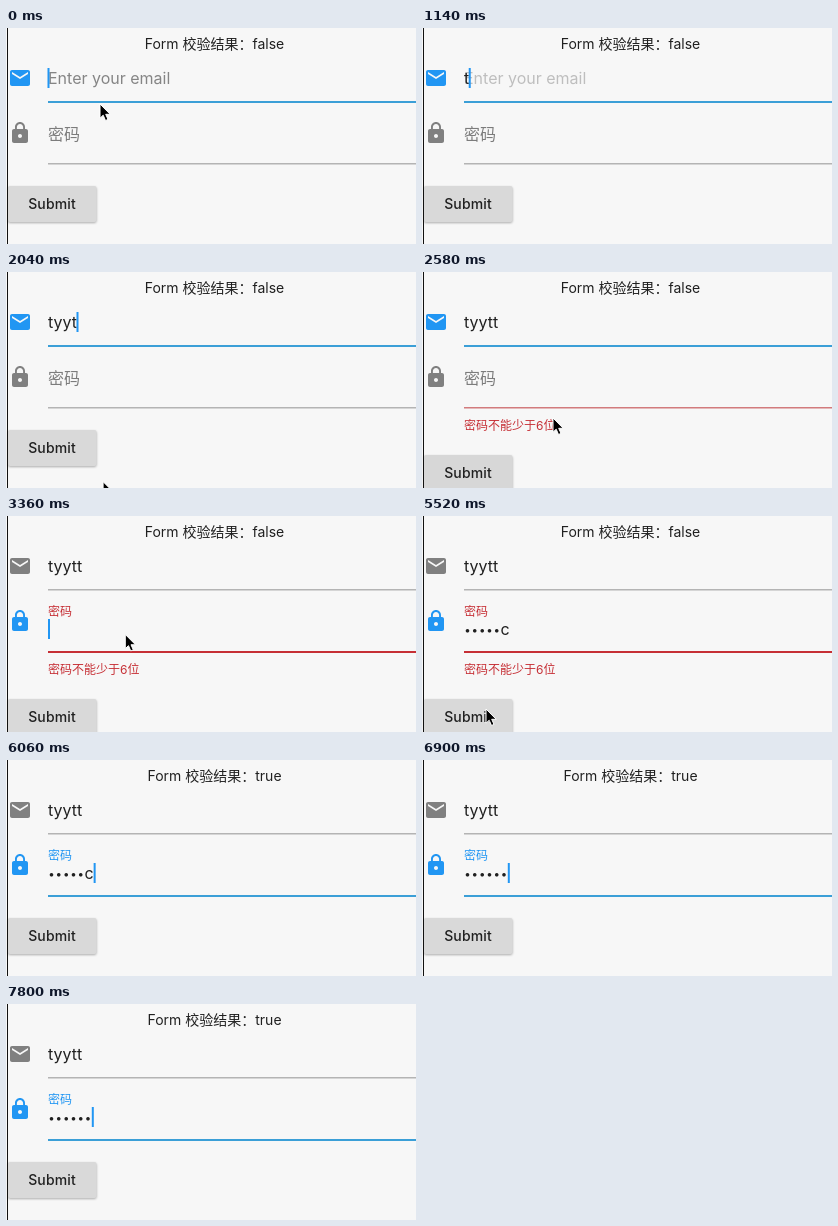
An HTML page for the animation above (7860 ms loop, 410 by 216 pixels).

```html
<!DOCTYPE html>
<html lang="zh">
<head>
<meta charset="utf-8">
<title>Form</title>
<style>
  html, body { margin: 0; width: 100%; height: 100%; overflow: hidden; background: #f7f7f7; }
  svg { display: block; width: 410px; height: 216px; }
  text { font-family: Inter, "Noto Sans CJK SC", "Noto Sans CJK", sans-serif; font-size: 16px; }
  #header { font-size: 14px; text-anchor: middle; }
  #hint { fill: #858585; }
  #bullets { font-size: 11.5px; }
  #error { font-size: 12px; fill: #c62f35; }
  #button text { font-size: 14px; font-weight: 500; text-anchor: middle; letter-spacing: .15px; }
  #button rect { filter: drop-shadow(0 1.5px 1.2px rgba(0, 0, 0, .3)); }
</style>
</head>
<body>
<svg viewBox="0 0 410 216" fill="#202020">
  <rect width="410" height="216" fill="#f7f7f7"/>
  <text id="header" x="208.5" y="21"></text>

  <path id="mail" transform="translate(2 38)" d="M20 4H4c-1.1 0-1.99.9-1.99 2L2 18c0 1.1.9 2 2 2h16c1.1 0 2-.9 2-2V6c0-1.1-.9-2-2-2zm0 4l-8 5-8-5V6l8 5 8-5v2z"/>
  <rect id="emailLine" x="42" y="73" width="368"/>
  <text id="hint" x="42" y="56">Enter your email</text>
  <text id="email" x="42" y="56"></text>

  <path id="lock" transform="translate(2 93)" d="M18 8h-1V6c0-2.76-2.24-5-5-5S7 3.24 7 6v2H6c-1.1 0-2 .9-2 2v10c0 1.1.9 2 2 2h12c1.1 0 2-.9 2-2V10c0-1.1-.9-2-2-2zm-6 9c-1.1 0-2-.9-2-2s.9-2 2-2 2 .9 2 2-.9 2-2 2zm3.1-9H8.9V6c0-1.71 1.39-3.1 3.1-3.1 1.71 0 3.1 1.39 3.1 3.1v2z"/>
  <rect id="passwordLine" x="42" y="135" width="368"/>
  <text id="label">密码</text>
  <text id="bullets" y="117.5"></text>
  <text id="lastChar" y="119"></text>
  <text id="error" x="42" y="157.5">密码不能少于6位</text>
  <rect id="caret" width="2" height="20" fill="#2196f3"/>

  <g id="button">
    <rect x="2" y="158" width="88.5" height="36" rx="2" fill="#d9d9d9"/>
    <circle id="ripple" cx="60" cy="178" fill="#000" clip-path="url(#buttonClip)"/>
    <text x="46" y="181">Submit</text>
  </g>
  <clipPath id="buttonClip"><rect x="2" y="158" width="88.5" height="36" rx="2"/></clipPath>

  <rect x="1" width="1" height="216" fill="#111"/>
  <path id="pointer" d="M0 0V14.2L3.2 11.2L5.5 16.5L8 15.4L5.7 10.3H10.2Z" fill="#000" stroke="#fff"/>
</svg>
<script>
const LOOP = 7860, BLINK = LOOP / 8, BLINK_PHASE = 220;
const LEFT = 42, BULLET_STEP = 7.3;
const BLUE = '#2196f3', LINE_BLUE = '#3b9fd7', GREY = '#808080', LINE_GREY = '#b4b4b4';
const RED = '#c62f35', LINE_RED = '#d27b7d';

const FIRST_SUBMIT = 2260, FOCUS_PASSWORD = 3150, SECOND_SUBMIT = 5720, MASK_LAST = 6820;
const EMAIL = { text: 'tyytt', start: 1040, step: 260 };
const PASSWORD = { text: 'hnbvxc', start: 3890, step: 170 };

// The pointer rests between moves; y = 222 is below the stage.
const MOVES = [
  { at: 60, ms: 420, x: 114, y: 222 },
  { at: 1980, ms: 160, x: 62, y: 184 },
  { at: 2320, ms: 260, x: 131, y: 146 },
  { at: 2640, ms: 420, x: 118, y: 106 },
  { at: 3300, ms: 300, x: 130, y: 222 },
  { at: 5200, ms: 300, x: 64, y: 193 },
  { at: 5800, ms: 180, x: 72, y: 222 }
];

const $ = id => document.getElementById(id);
const set = (id, attrs) => Object.entries(attrs).forEach(([k, v]) => $(id).setAttribute(k, v));
const clamp = (v, max = 1) => Math.max(0, Math.min(max, v));
const progress = (t, start, length = 200) => clamp((t - start) / length);
const ease = p => p * p * (3 - 2 * p);
const typedCount = (t, { text, start, step }) => clamp(Math.floor((t - start) / step) + 1, text.length);

function drawPointer(t) {
  let x = 94, y = 76;
  for (const move of MOVES) {
    const p = ease(progress(t, move.at, move.ms));
    x += (move.x - x) * p;
    y += (move.y - y) * p;
  }
  set('pointer', { transform: `translate(${x} ${y})` });
}

function drawRipple(t) {
  const press = (t < FOCUS_PASSWORD ? FIRST_SUBMIT : SECOND_SUBMIT) - 60;
  set('ripple', { r: 70 * progress(t, press, 300), opacity: 0.1 * (1 - progress(t, press + 150, 250)) });
}

function caretOpacity(t) {
  const lastKey = ({ start, step }, n) => n ? start + (n - 1) * step : -Infinity;
  const wake = [
    lastKey(EMAIL, typedCount(t, EMAIL)),
    lastKey(PASSWORD, typedCount(t, PASSWORD)),
    FOCUS_PASSWORD
  ];
  if (wake.some(w => t >= w && t < w + 300)) return 1;
  const phase = (t + BLINK_PHASE) % BLINK;
  return progress(phase, 0, 150) - progress(phase, BLINK / 2, 150);
}

function drawEmail(t) {
  $('email').textContent = EMAIL.text.slice(0, typedCount(t, EMAIL));
  set('hint', { opacity: 1 - progress(t, EMAIL.start) });
  return LEFT + $('email').getComputedTextLength();
}

function drawPassword(t) {
  const typed = typedCount(t, PASSWORD);
  const masked = t >= MASK_LAST ? typed : Math.max(0, typed - 1);
  const end = LEFT + masked * BULLET_STEP;
  $('bullets').textContent = '•'.repeat(masked);
  set('bullets', { x: Array.from({ length: masked }, (_, i) => LEFT + 0.3 + i * BULLET_STEP).join(' ') });
  $('lastChar').textContent = PASSWORD.text.slice(masked, typed);
  set('lastChar', { x: end });
  return end + $('lastChar').getComputedTextLength();
}

function render(t) {
  const onPassword = t >= FOCUS_PASSWORD;
  const valid = t >= SECOND_SUBMIT;
  const invalid = t >= FIRST_SUBMIT && !valid;

  $('header').textContent = `Form 校验结果：${valid}`;
  set('mail', { fill: onPassword ? GREY : BLUE });
  set('lock', { fill: onPassword ? BLUE : GREY });
  set('emailLine', { fill: onPassword ? LINE_GREY : LINE_BLUE, height: onPassword ? 1.5 : 2 });
  set('passwordLine', {
    fill: onPassword ? (invalid ? RED : LINE_BLUE) : (invalid ? LINE_RED : LINE_GREY),
    height: onPassword ? 2 : 1.5
  });

  const emailEnd = drawEmail(t), passwordEnd = drawPassword(t);
  set('caret', {
    x: onPassword ? passwordEnd : emailEnd - 0.5,
    y: onPassword ? 103 : 40,
    opacity: caretOpacity(t)
  });

  const float = ease(progress(t, FOCUS_PASSWORD));
  set('label', {
    transform: `translate(${LEFT} ${111.5 - 12 * float}) scale(${1 - 0.25 * float})`,
    fill: !onPassword ? '#7c7c7c' : invalid ? RED : BLUE
  });

  const shown = progress(t, FIRST_SUBMIT) - progress(t, SECOND_SUBMIT);
  set('error', { opacity: shown, transform: `translate(0 ${-3 * (1 - shown)})` });
  set('button', { transform: `translate(0 ${invalid ? 25 : 0})` });

  drawRipple(t);
  drawPointer(t);
}

const began = performance.now();
function tick() {
  render((performance.now() - began) % LOOP);
  requestAnimationFrame(tick);
}
tick();
</script>
</body>
</html>
```
